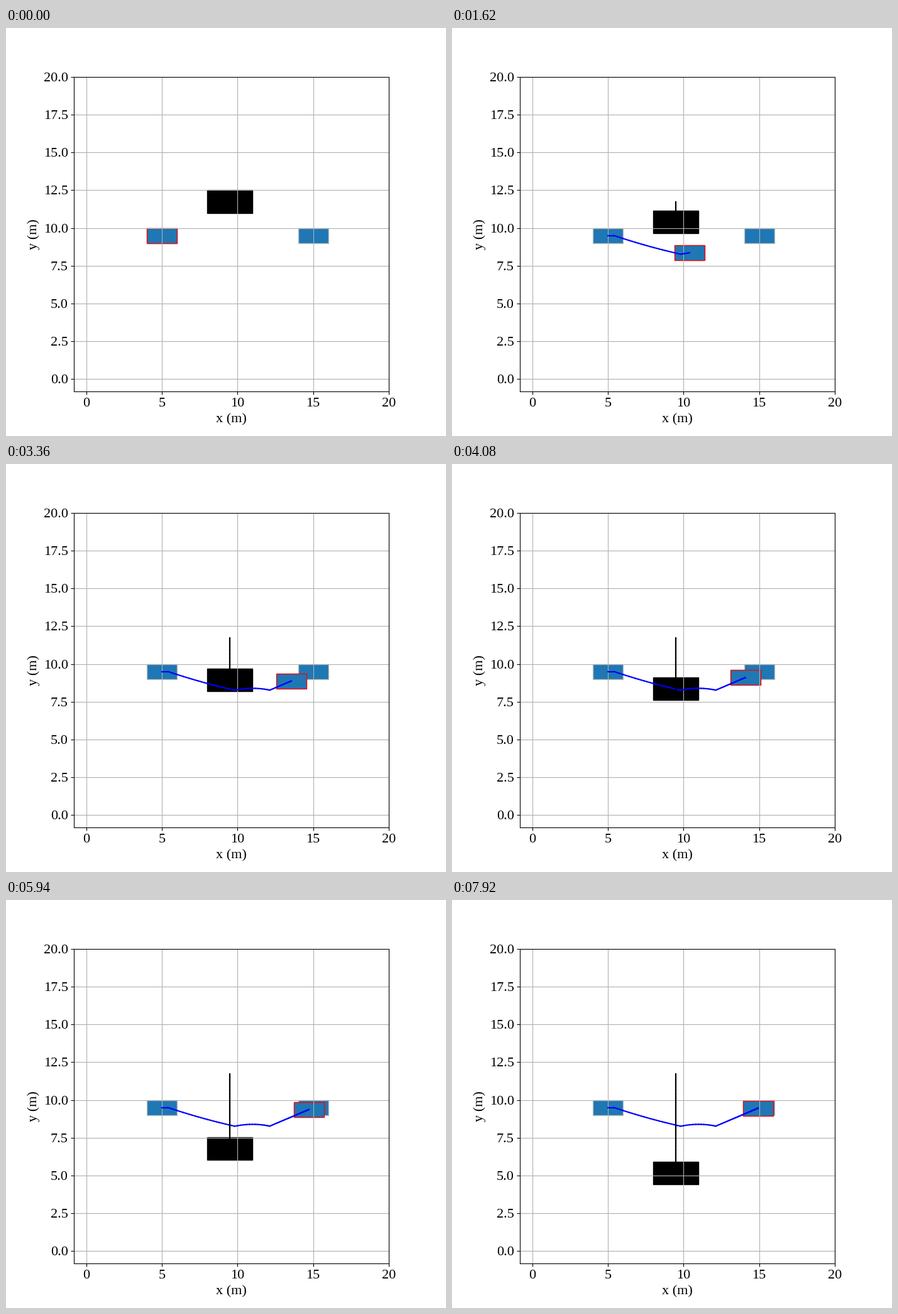
A matplotlib script for the animation above (7.98 s loop, 700x650 px).

```python
import numpy as np
import matplotlib.pyplot as plt
from matplotlib.animation import FuncAnimation
from matplotlib.collections import LineCollection
from matplotlib.patches import Rectangle

FRAMES, INTERVAL = 133, 60
GOAL = (15, 9.5)
HEADING = np.array([15, 9.49])    # point the final approach converges to
TURN = np.array([12.13, 8.27])    # where that approach begins
CRUISE, APPROACH = 28, 38         # steps at which the car changes its speed law
DECAY = 0.9625
CAR, OBSTACLE = (2, 1), (3, 1.5)


def detour(x):
    """Slide down ahead of the obstacle, then a low arch below it."""
    d = max(x - 5.4, 0)
    slide = 9.5 - 0.335 * d + 0.0125 * d ** 2
    arch = 8.39 - 0.094 * (x - 11) ** 2
    return max(slide, arch)


def car_at(n):
    if n > APPROACH:
        return HEADING - (HEADING - TURN) * DECAY ** (n - APPROACH)
    x = 5 + 0.2 * n - 0.0047 * max(n - CRUISE, 0) ** 2
    return np.array([x, detour(x)])


def obstacle_at(n):
    return np.array([9.5, 11.75 - 0.05 * n])


def corner(center, size):
    return np.asarray(center) - np.array(size) / 2


plt.rcParams.update({"font.family": "Liberation Serif", "font.size": 16})
fig, ax = plt.subplots(figsize=(7, 6.5), dpi=100)
ax.set_aspect("equal")
ax.set(xlim=(-0.8, 20), ylim=(-0.8, 20), xlabel="x (m)", ylabel="y (m)",
       xticks=np.arange(0, 21, 5), yticks=np.arange(0, 20.1, 2.5))
ax.tick_params(axis="x", pad=4.3)
ax.grid(True)


def add_box(center, size, face, edge):
    return ax.add_patch(Rectangle(corner(center, size), *size, fc=face, ec=edge, lw=1))


def add_trail(color):
    trail = LineCollection([], colors=color, linewidths=1.5, capstyle="projecting", zorder=2.1)
    return ax.add_collection(trail, autolim=False)


def add_mover(place, size, face, edge, trail_color):
    path = np.array([place(n) for n in range(FRAMES)])
    return add_box(path[0], size, face, edge), size, path, add_trail(trail_color)


for spot in (car_at(0), GOAL):
    add_box(spot, CAR, "C0", "silver")
movers = [add_mover(car_at, CAR, "C0", "red", "blue"),
          add_mover(obstacle_at, OBSTACLE, "black", "black", "black")]


def update(n):
    for box, size, path, trail in movers:
        box.set_xy(corner(path[n], size))
        trail.set_segments([path[i:i + 2] for i in range(n)])
    return [m[0] for m in movers] + [m[3] for m in movers]


anim = FuncAnimation(fig, update, frames=FRAMES, interval=INTERVAL, repeat=True, repeat_delay=0)
plt.show()
```
